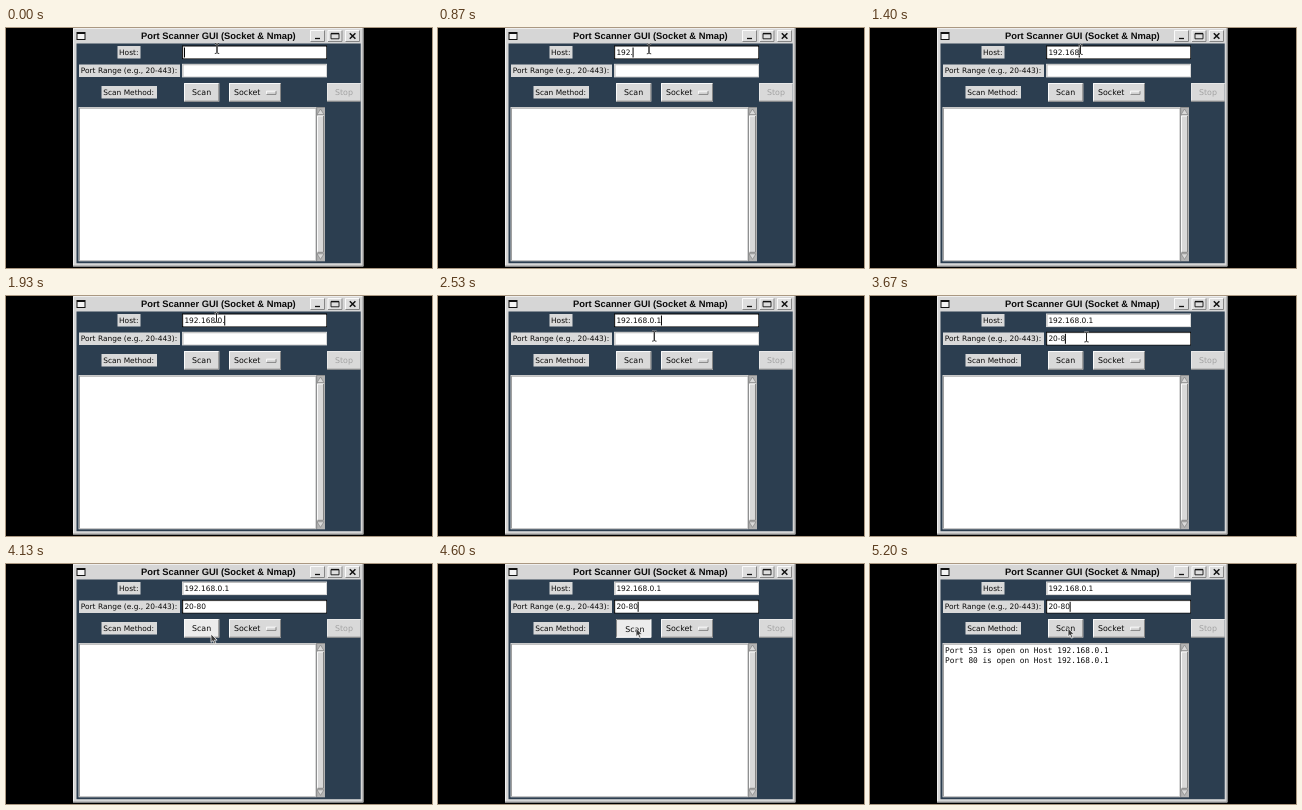
An HTML page for the animation above (5270 ms loop, 426x240 px).

```html
<!DOCTYPE html>
<html lang="en">
<head>
<meta charset="utf-8">
<title>Port Scanner GUI</title>
<style>
html, body { margin: 0; width: 100%; height: 100%; overflow: hidden; background: #000; }
svg { display: block; width: 426px; height: 240px; }
text { font-family: "DejaVu Sans", sans-serif; font-size: 7.45px; fill: #0a0a0a; white-space: pre; text-rendering: geometricPrecision; }
.title { font: bold 9.36px "Liberation Sans", Arial, sans-serif; }
.btn { font-size: 7.9px; }
.mono { font-family: "DejaVu Sans Mono", monospace; font-size: 7.78px; }
</style>
</head>
<body>
<svg id="stage" viewBox="0 0 426 240"></svg>
<script>
const LOOP = 5270, STEP = 1000 / 15;
const GREY = '#d9d9d9', HOVER = '#ececec', LIGHT = '#fafafa', SHADE = '#858585';
const stage = document.getElementById('stage');

function add(tag, attrs, parent = stage) {
  const el = document.createElementNS('http://www.w3.org/2000/svg', tag);
  for (const k in attrs) el.setAttribute(k, attrs[k]);
  parent.appendChild(el);
  return el;
}
const rect = (x, y, width, height, fill, parent) => add('rect', { x, y, width, height, fill }, parent);
const path = (d, attrs, parent) => add('path', { d, fill: 'none', ...attrs }, parent);
function label(str, x, y, cls = '', parent) {
  const el = add('text', { x, y, class: cls }, parent);
  el.textContent = str;
  return el;
}

// Box with light and dark edges; returns a setter for its look.
function bevel(x, y, w, h, fill = GREY, parent) {
  const face = rect(x, y, w, h, fill, parent);
  const a = path(`M${x + .5} ${y + h - .5}V${y + .5}H${x + w - .5}`, {}, parent);
  const b = path(`M${x + w - .5} ${y + .5}V${y + h - .5}H${x + .5}`, {}, parent);
  const set = (color, sunken) => {
    face.setAttribute('fill', color);
    a.setAttribute('stroke', sunken ? SHADE : LIGHT);
    b.setAttribute('stroke', sunken ? LIGHT : SHADE);
  };
  set(fill, false);
  return set;
}

function entry(y) {
  const ring = rect(176, y, 145, 13.6, GREY);
  rect(176.8, y + .8, 143.4, 12, '#a8a8a8');
  rect(177.4, y + 1.4, 142.8, 11.4, '#fff');
  const text = label('', 178.4, y + 9.2);
  const caret = rect(0, y + 2, 1, 10, '#000');
  return (str, focused, blinkOn) => {
    text.textContent = str;
    ring.setAttribute('fill', focused ? '#000' : GREY);
    caret.setAttribute('x', 178 + (str ? text.getComputedTextLength() : 0));
    caret.setAttribute('visibility', focused && blinkOn ? 'visible' : 'hidden');
  };
}

// Window frame and title bar
rect(67, 0, 290.5, 238.5, '#d6d6d6');
path('M67.5 238V.5H357', { stroke: '#eee' });
path('M357 0V238H67', { stroke: '#999' });
rect(70.5, 15.5, 284.2, 219.7, '#2c3e50');
rect(70.5, 4, 9, 8, '#111');
rect(71.5, 6, 7, 5, '#f4f4f4');
label('Port Scanner GUI (Socket & Nmap)', 135, 10.6, 'title');
[304, 321.5, 339].forEach(x => bevel(x, 2, 15, 12, '#dedede'));
path('M309 10.5H314', { stroke: '#111', 'stroke-width': 1.3 });
path('M325 5.5H333V10.8H325Z', { stroke: '#111', 'stroke-width': .9 });
path('M325 5.6H333', { stroke: '#111', 'stroke-width': 1.5 });
path('M343.8 5.2L349.4 10.8M349.4 5.2L343.8 10.8', { stroke: '#111', 'stroke-width': 1.5 });

// Form labels
rect(111.5, 18, 23, 12.5, GREY);
label('Host:', 113, 26.7);
rect(73, 36.5, 101, 12.5, GREY);
label('Port Range (e.g., 20-443):', 74.8, 45.2);
rect(95.5, 58, 55.5, 12.5, GREY);
label('Scan Method:', 97.2, 66.9);

const host = entry(17.5), ports = entry(35.8);

// Buttons
const scan = bevel(178, 55, 35.3, 18.7);
const scanText = label('Scan', 186, 67, 'btn');
bevel(223, 55, 52, 18.7);
label('Socket', 228, 67, 'btn');
bevel(260, 62.7, 10.5, 4.2);
rect(321, 55, 33.7, 18.5, GREY);
path('M321.5 73V55.5H354.7', { stroke: '#e8e8e8' });
path('M321 73.2H354.7', { stroke: SHADE });
const stopText = label('Stop', 329, 67, 'btn');

// Results and scrollbar
rect(72.5, 79, 237.8, 154.3, GREY);
rect(73.3, 79.8, 236.4, 152.7, '#888');
rect(74, 80.5, 235.6, 151.8, '#fff');
const results = add('g', {});
[53, 80].forEach((port, i) =>
  label(`Port ${port} is open on Host 192.168.0.1`, 75, 89 + i * 10.2, 'mono', results));
rect(310.2, 79, 8.8, 154.3, '#b3b3b3');
path('M310.7 233V79.5H319', { stroke: '#858585', 'stroke-width': .8 });
bevel(311, 87.5, 7, 137.3);
path('M314.5 81L318 86.6H311Z', { fill: GREY, stroke: SHADE, 'stroke-width': .7 });
path('M314.5 231.4L318 225.8H311Z', { fill: GREY, stroke: SHADE, 'stroke-width': .7 });

// Pointers
const beam = add('g', {});
const beamShape = 'M-2.2 -5Q0 -5 0 -4V4Q0 5 -2.2 5M2.2 -5Q0 -5 0 -4V4Q0 5 2.2 5';
path(beamShape, { stroke: '#fff', 'stroke-width': 2, opacity: .6 }, beam);
path(beamShape, { stroke: '#222', 'stroke-width': .9 }, beam);
const arrow = add('g', {});
path('M0 0V8.4L2 6.6L3.5 10L5 9.3L3.5 6.1H6.1Z',
  { fill: '#3c3c3c', stroke: '#f2f2f2', 'stroke-width': .8 }, arrow);

// Timeline
const hostKeys = [330, 460, 600, 800, 1000, 1130, 1330, 1530, 1700, 1860, 2060];
const portKeys = [3130, 3260, 3400, 3530, 3700];
const FOCUS = 2630, PRESS = 4460, RELEASE = 4660, DONE = 4800;
const moves = [
  [0, 211, 20.5], [870, 211, 20.8], [1400, 210.5, 21.5], [2200, 210.5, 21.5],
  [2330, 211, 19.5], [2560, 216.5, 41], [3740, 216.5, 41], [3870, 214, 60],
  [3970, 210, 78], [4130, 205, 70], [4330, 198, 64.2], [LOOP, 198, 64.2]
];

const typed = (str, keys, t) => str.slice(0, keys.filter(k => k <= t).length);

// The caret shows for 300 ms and hides for 150 ms, restarting on each key.
function blink(t, starts) {
  const last = Math.max(...starts.filter(s => s <= t));
  return (t - last) % 450 < 300;
}

function pointer(t) {
  const i = Math.max(1, moves.findIndex(m => m[0] > t));
  const [t0, x0, y0] = moves[i - 1], [t1, x1, y1] = moves[i];
  const p = (t - t0) / (t1 - t0), e = p * p * (3 - 2 * p);
  return [x0 + (x1 - x0) * e, y0 + (y1 - y0) * e];
}

const show = (el, on) => el.setAttribute('visibility', on ? 'visible' : 'hidden');

function draw(t) {
  const inPorts = t >= FOCUS;
  host(typed('192.168.0.1', hostKeys, t), !inPorts, t < 330 || blink(t, hostKeys));
  ports(typed('20-80', portKeys, t), inPorts, inPorts && blink(t, [FOCUS, ...portKeys]));

  const [x, y] = pointer(t);
  const overEntry = y < 31 || (y > 35.8 && y < 49.4);
  show(beam, overEntry);
  show(arrow, !overEntry);
  (overEntry ? beam : arrow).setAttribute('transform', `translate(${x} ${y})`);

  const over = x > 178 && x < 213 && y > 55 && y < 74;
  const down = t >= PRESS && t < RELEASE;
  scan(over && t < RELEASE ? HOVER : GREY, down);
  scanText.setAttribute('transform', down ? 'translate(1.2 1)' : '');
  stopText.style.fill = t >= RELEASE && t < DONE ? '#0a0a0a' : '#a3a3a3';
  show(results, t >= DONE);
}

const start = performance.now();
function frame() {
  const t = (performance.now() - start) % LOOP;
  draw(Math.floor((t + 4) / STEP) * STEP);
  requestAnimationFrame(frame);
}
frame();
</script>
</body>
</html>
```
